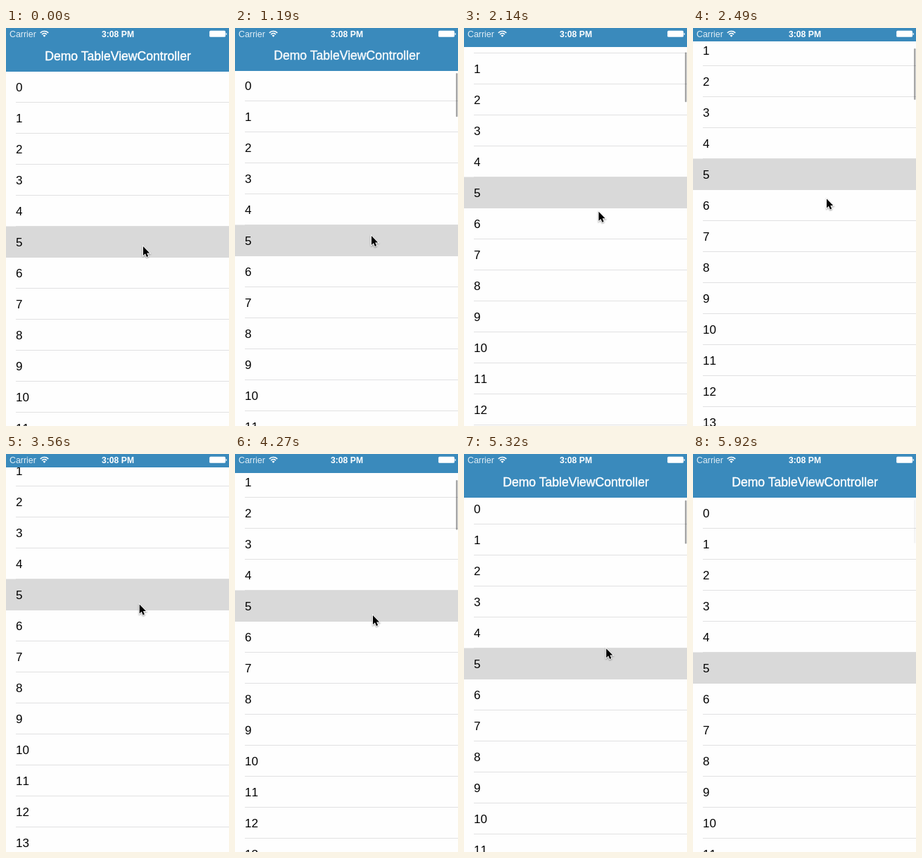
Animation, 317 px wide and 565 px high, one loop 6660 ms. Source, as an HTML page with a canvas:

```html
<!DOCTYPE html>
<html lang="en">
<head>
<meta charset="utf-8">
<title>Collapsing navigation bar</title>
<style>
  html, body { margin: 0; width: 100%; height: 100%; overflow: hidden; background: #fefefe; }
  canvas { display: block; }
</style>
</head>
<body>
<canvas id="stage" width="317" height="565"></canvas>
<script>
const W = 317, H = 565, LOOP = 6660, HOLD = 598, STEP = 118.2;
const ROW = 44, BAR_OPEN = 62, COLLAPSE = 43, MAX_DRAG = 61, CONTENT = 4090;
const BLUE = '#3a8abc';
const SANS = '"Liberation Sans", Arial, sans-serif';
const ctx = document.getElementById('stage').getContext('2d');

const clamp = (v, lo, hi) => Math.min(hi, Math.max(lo, v));

// Pointer path: [step, x, y]
const POINTER = [
  [-1, 194, 309], [5, 193, 294], [10, 192, 278], [16, 189, 241.5],
  [17, 187, 230], [19, 185, 214], [21, 184, 207], [22, 184, 207],
  [28, 193.5, 218], [31, 195, 228], [36, 199, 257.5], [40, 202, 281], [43, 203, 290]
];
const PULL = { 41: 2, 42: 4, 43: 4, 44: 1 };        // stretch past the top edge
const FADE = { 18: 0.5, 44: 0.6, 45: 0.12 };        // scroll indicator fading out

function pointerAt(step) {
  const i = POINTER.findIndex(key => key[0] >= step);
  if (i < 0) return POINTER[POINTER.length - 1].slice(1);
  if (i === 0) return POINTER[0].slice(1);
  const [n0, x0, y0] = POINTER[i - 1], [n1, x1, y1] = POINTER[i];
  const p = (step - n0) / (n1 - n0);
  return [x0 + (x1 - x0) * p, y0 + (y1 - y0) * p];
}

function stateAt(step) {
  const [x, y] = pointerAt(step);
  const closing = step < 20;
  const drag = clamp(closing ? 295 - y : y - 220, 0, MAX_DRAG);
  const moved = drag + Math.min(drag, COLLAPSE);
  const collapsed = closing ? Math.min(drag, COLLAPSE) : Math.max(0, COLLAPSE - drag);
  const top = closing ? BAR_OPEN - moved : BAR_OPEN - MAX_DRAG - COLLAPSE + moved;
  const scrolling = closing ? drag > 0 && step < 19 : step >= 29;
  return {
    x, y, collapsed,
    bar: Math.round(BAR_OPEN - collapsed),
    top: Math.round(top + (PULL[step] || 0)),
    indicator: scrolling ? FADE[step] ?? 1 : 0,
    pointer: step < 44
  };
}

function text(str, x, y, font, color, align = 'left', kerning = 'none') {
  ctx.font = `${font} ${SANS}`;
  ctx.fontKerning = kerning;
  ctx.fillStyle = color;
  ctx.textAlign = align;
  ctx.fillText(str, x, y);
}

function rounded(x, y, w, h, r) {
  ctx.beginPath();
  ctx.roundRect(x, y, w, h, r);
}

function drawRows(top) {
  for (let i = 0; i < 16; i++) {
    ctx.fillStyle = '#e1e1e2';
    ctx.fillRect(14, top + (i + 1) * ROW - 1, W - 14, 1);
  }
  ctx.fillStyle = '#d9d9d9';
  ctx.fillRect(0, top + 5 * ROW - 0.5, W, ROW + 0.5);
  for (let i = 0; i < 16; i++) text(i, 14, top + i * ROW + 28, '17px', '#000');
}

function drawIndicator({ bar, top, indicator }) {
  const view = H - bar;
  const y = bar + 3 + Math.max(0, bar - top) * view / CONTENT;
  ctx.fillStyle = `rgba(0,0,0,${0.34 * indicator})`;
  rounded(314, y, 2.5, view * view / CONTENT, 1.25);
  ctx.fill();
}

function drawBar({ bar, collapsed }) {
  ctx.fillStyle = BLUE;
  ctx.fillRect(0, 0, W, bar);

  ctx.globalAlpha = Math.max(0, 1 - collapsed / 24);
  const y = bar - 16;
  text('Demo TableViewController', 159, y, '17.6px', '#fff', 'center', 'normal');
  ctx.strokeStyle = '#fff';
  ctx.lineWidth = 0.4;
  ctx.strokeText('Demo TableViewController', 159, y);
  ctx.globalAlpha = 1;
}

function drawStatus() {
  text('Carrier', 5, 13, '12.4px', '#e2eef6');
  text('3:08 PM', 159, 13, 'bold 12.2px', '#fff', 'center');

  // Wi-Fi
  ctx.strokeStyle = ctx.fillStyle = '#fff';
  ctx.lineWidth = 1.7;
  for (const r of [4.6, 7.8]) {
    ctx.beginPath();
    ctx.arc(54.5, 12.3, r, -Math.PI * 0.76, -Math.PI * 0.24);
    ctx.stroke();
  }
  ctx.beginPath();
  ctx.moveTo(54.5, 12.7);
  ctx.arc(54.5, 12.7, 2.8, -Math.PI * 0.76, -Math.PI * 0.24);
  ctx.fill();

  // Battery
  rounded(289.2, 3.8, 22.8, 9, 1.6);
  ctx.fill();
  rounded(312.6, 7, 1.2, 3, 0.6);
  ctx.fill();
}

function drawPointer({ x, y }) {
  ctx.save();
  ctx.translate(x + 1, y + 1);
  ctx.scale(0.93, 0.93);
  ctx.beginPath();
  for (const [px, py] of [[0, 0], [0, 14], [3.2, 11.1], [5.3, 16], [7.7, 15], [5.6, 10.2], [9.9, 10.2]])
    ctx.lineTo(px, py);
  ctx.closePath();
  ctx.shadowColor = 'rgba(0,0,0,.4)';
  ctx.shadowBlur = 2;
  ctx.shadowOffsetY = 1;
  ctx.strokeStyle = '#fff';
  ctx.lineWidth = 2;
  ctx.stroke();
  ctx.shadowColor = 'transparent';
  ctx.fillStyle = '#000';
  ctx.fill();
  ctx.restore();
}

function draw(now) {
  const step = clamp(Math.floor((now % LOOP - HOLD) / STEP), -1, 45);
  const state = stateAt(step);
  ctx.fillStyle = '#fefefe';
  ctx.fillRect(0, 0, W, H);
  drawRows(state.top);
  if (state.indicator) drawIndicator(state);
  drawBar(state);
  drawStatus();
  if (state.pointer) drawPointer(state);
}

const start = performance.now();
function tick() {
  draw(performance.now() - start);
  requestAnimationFrame(tick);
}
tick();
</script>
</body>
</html>
```
